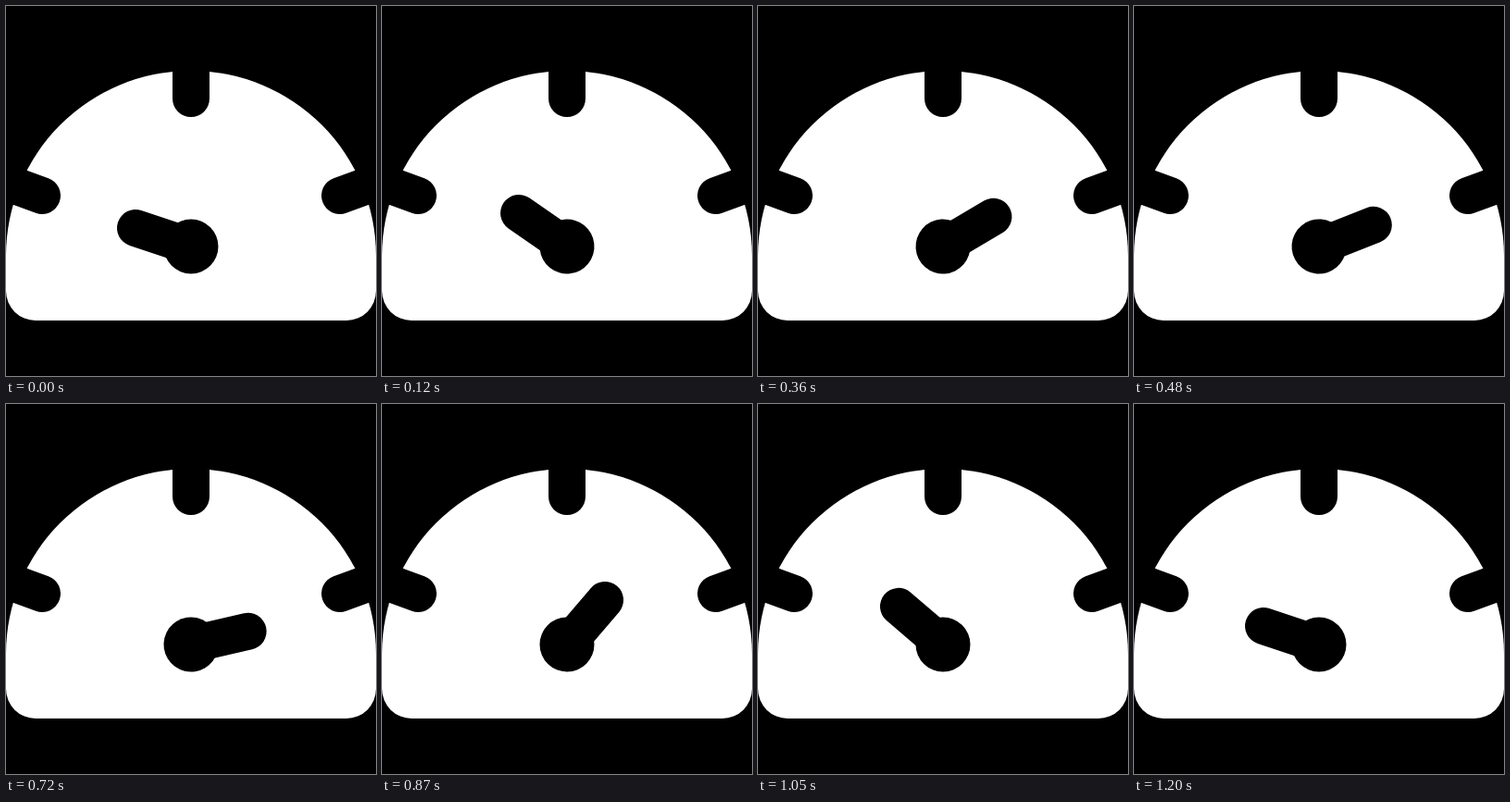
An HTML page for the animation above (3230 ms loop, 400 by 400 pixels).

```html
<!DOCTYPE html>
<html lang="en">
<head>
<meta charset="utf-8">
<title>Gauge</title>
<style>
  html, body { margin: 0; height: 100%; overflow: hidden; background: #000; }
  svg { display: block; width: 100%; height: 100%; }
  .ink { fill: none; stroke: #000; stroke-width: 40; stroke-linecap: round; }
</style>
</head>
<body>
<svg viewBox="0 0 400 400">
  <path fill="#fff" d="M0 270A200 200 0 0 1 400 270V308A32 32 0 0 1 368 340H32A32 32 0 0 1 0 308Z"/>
  <path class="ink" d="M200 100V20M39 205L-55 170.8M361 205L455 170.8"/>
  <g id="needle">
    <path class="ink" stroke-width="39.5" d="M200 260L140 240"/>
    <circle cx="200" cy="260" r="29.5"/>
  </g>
</svg>
<script>
  const LOOP = 3230, TICK = 30, STEP = 120;
  // Needle turn in degrees, one key per STEP ms
  const turns = [0, 16.3, 86.3, 131, 140, 147, 148.6, 124, 67.3, 11.3, 0];
  const last = turns.length - 1;
  const needle = document.getElementById('needle');

  // Smooth curve through the keys, level at both ends
  function turnAt(ms) {
    const pos = Math.min(ms / STEP, last);
    const i = Math.min(Math.floor(pos), last - 1);
    const u = pos - i;
    const a = turns[i], b = turns[i + 1];
    const slope = k => k === 0 || k === last ? 0 : (turns[k + 1] - turns[k - 1]) / 2;
    const v = 1 - u;
    return a * v * v * (1 + 2 * u) + b * u * u * (3 - 2 * u)
      + slope(i) * u * v * v - slope(i + 1) * u * u * v;
  }

  function draw(now) {
    const ms = Math.floor(now % LOOP / TICK) * TICK;
    needle.setAttribute('transform', `rotate(${turnAt(ms)} 200 260)`);
    requestAnimationFrame(draw);
  }
  draw(performance.now());
</script>
</body>
</html>
```
